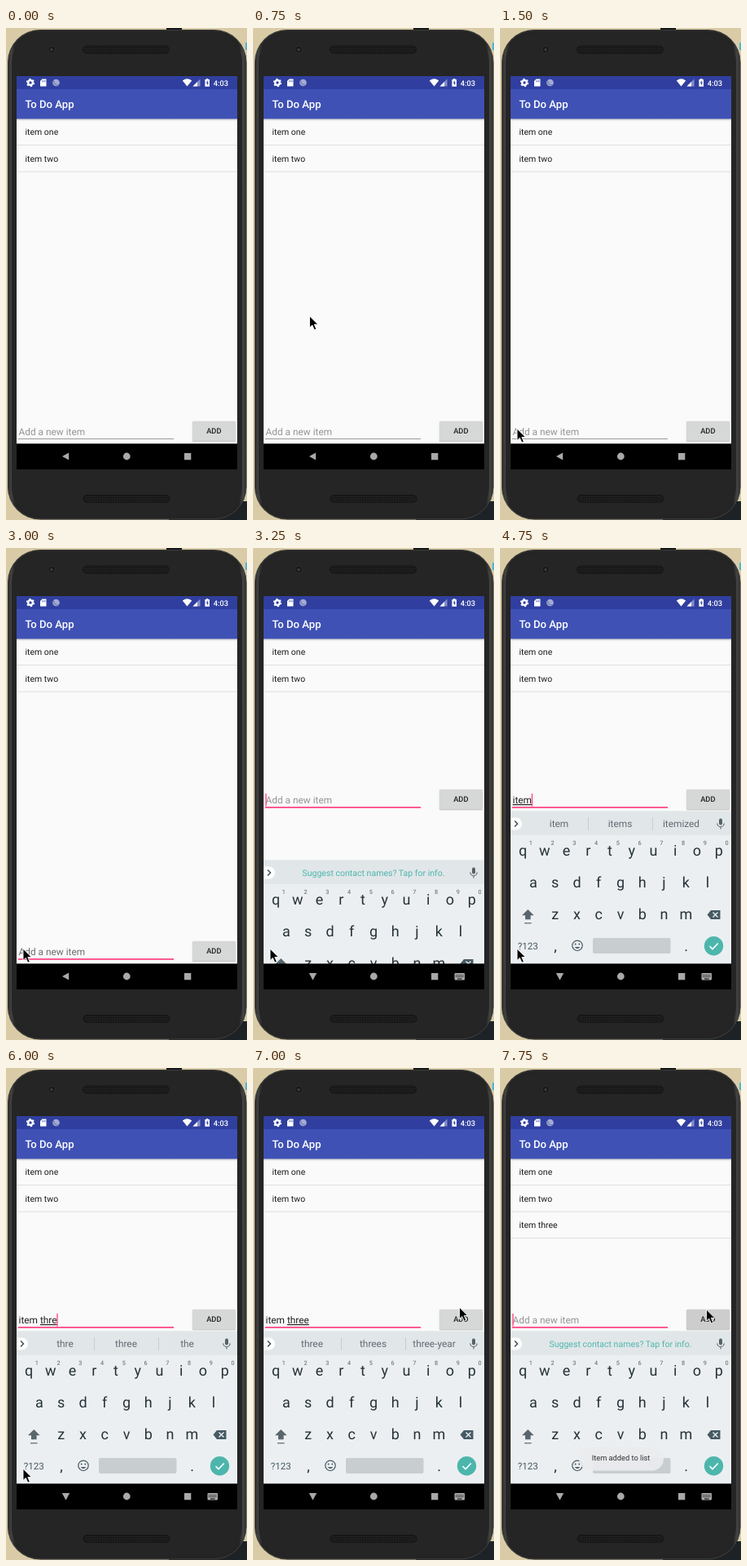
Recreate the animation shown at these times as an HTML page. Size 296x603 px, loop 8000 ms.

```html
<!DOCTYPE html>
<html lang="en">
<head>
<meta charset="utf-8">
<title>To Do App</title>
<style>
  html, body { margin: 0; width: 100%; height: 100%; overflow: hidden; background: #d8cba6; }
  svg { display: block; width: 296px; height: 603px; font-family: Roboto, sans-serif; text-rendering: geometricPrecision; }
  text { white-space: pre; }
  .mid { text-anchor: middle; }
  .med { font-weight: 500; }
  .row { font-size: 10.5px; fill: #1c1c1c; }
  .field { font-size: 11.86px; }
  .under { text-decoration: underline; text-decoration-thickness: 0.8px; }
  .key { font-size: 18px; fill: #263238; }
  .sug { font-size: 11.86px; fill: #5f6b71; }
</style>
</head>
<body>
<svg viewBox="0 0 296 603">
  <defs>
    <linearGradient id="side">
      <stop offset="0" stop-color="#2a2a2a"/>
      <stop offset=".012" stop-color="#424242"/>
      <stop offset=".03" stop-color="#242424"/>
      <stop offset=".97" stop-color="#242424"/>
      <stop offset=".988" stop-color="#454545"/>
      <stop offset="1" stop-color="#2a2a2a"/>
    </linearGradient>
    <linearGradient id="shade" x2="0" y2="1">
      <stop offset="0" stop-opacity=".22"/>
      <stop offset="1" stop-opacity="0"/>
    </linearGradient>
    <pattern id="mesh" width="3" height="3" patternUnits="userSpaceOnUse">
      <rect width="3" height="3" fill="#191919"/>
      <circle cx="1.5" cy="1.5" r=".8" fill="#262626"/>
    </pattern>
    <clipPath id="panel"><rect x="13" y="111" width="271" height="399"/></clipPath>
  </defs>

  <!-- desktop and phone body -->
  <rect width="296" height="603" fill="#d8cba6"/>
  <path d="M197 0h19v4h-19z" fill="#15171a"/>
  <path d="M294 18h2v9h-2z" fill="#4fb3d2"/>
  <path d="M200 599h96v4h-96zM264 580h32v23h-32z" fill="#1c2226"/>
  <rect x="2" y="2" width="293.500" height="600.500" rx="40" fill="#2a2a2a"/>
  <rect x="2.800" y="2.800" width="292" height="599" rx="39.500" fill="url(#side)" stroke="#474747" stroke-width=".7"/>
  <rect x="7" y="7" width="283" height="590.500" rx="35" fill="#252525"/>
  <rect x="94.500" y="22" width="106" height="9" rx="4.500" fill="url(#mesh)" stroke="#141414"/>
  <rect x="95" y="572.500" width="106" height="9" rx="4.500" fill="url(#mesh)" stroke="#141414"/>
  <circle cx="56" cy="26.500" r="4.500" fill="#1a1a1a" stroke="#353535" stroke-width=".8"/>
  <circle cx="56" cy="26.500" r="1.600" fill="#3c4144"/>

  <!-- app -->
  <rect x="13" y="59" width="271" height="482" fill="#fafafa"/>
  <rect x="13" y="59" width="271" height="16" fill="#303f9f"/>
  <rect x="13" y="75" width="271" height="36.400" fill="#3f51b5"/>
  <rect x="13" y="111.400" width="271" height="2.600" fill="url(#shade)"/>
  <text class="med" x="23.500" y="98" font-size="13.2" fill="#fff">To Do App</text>
  <g fill="#fff">
    <circle cx="30" cy="67" r="2.800" fill="none" stroke="#fff" stroke-width="2.200"/>
    <circle cx="30" cy="67" r="4.300" fill="none" stroke="#fff" stroke-width="1.700" stroke-dasharray="2.250 2.250"/>
    <path d="M44.500 62.500h5v9h-7.500v-6.500z"/>
    <path d="M44.500 64.500v1.800M46.200 64v2.300M48 64v2.300" stroke="#303f9f" stroke-width=".7"/>
    <circle cx="61.500" cy="67" r="4.300" fill="#a4abd3"/>
    <path d="M59 64.500a4 4 0 0 0 5 5" fill="none" stroke="#7681be" stroke-width="1.300"/>
    <path d="M216.800 64.500q5.700-4.500 11.400 0l-5.700 7z"/>
    <path d="M238.500 62.500v9h-9z" fill="#8790c8"/>
    <path d="M235 66v5.500h-5.500z"/>
    <path d="M246 62h2.400v1h1.600v8.700h-5.600v-8.700h1.600z"/>
    <path d="M247.700 64.300l-2 3.200h1.300v2.700l2-3.400h-1.300z" fill="#303f9f"/>
    <text class="med" x="254.800" y="70.700" font-size="9.300">4:03</text>
  </g>
  <g id="list"></g>

  <g id="entry">
    <text class="field" id="hint" x="15.500" y="499">Add a new item</text>
    <text class="field" x="15.500" y="499" fill="#212121"><tspan id="done"></tspan><tspan id="word" class="under"></tspan></text>
    <rect id="line" x="15" width="191"/>
    <rect id="caret" y="487" width="1.300" height="15.500" fill="#ff4081"/>
    <rect x="228.500" y="482" width="54" height="25.800" rx="2" fill="#000" opacity=".1"/>
    <rect x="229" y="482.500" width="53" height="24.500" rx="1.500" fill="#000" opacity=".13"/>
    <rect id="button" x="229" y="481.700" width="53" height="24.500" rx="1.500"/>
    <text class="mid med" x="255.300" y="496.800" font-size="9.300" fill="#212121">ADD</text>
  </g>

  <!-- keyboard -->
  <g clip-path="url(#panel)"><g id="board">
    <rect x="13" y="322.500" width="271" height="190" fill="#eceff1"/>
    <rect x="13" y="322.500" width="271" height="29.500" fill="#e1e6e9"/>
    <path d="M13 330.500h6.500a7.500 7.500 0 0 1 0 15h-6.500z" fill="#fff"/>
    <path d="M18 334.500l3.500 3.500l-3.500 3.500" fill="none" stroke="#37474f" stroke-width="1.400"/>
    <text id="offer" class="mid" x="148" y="341.800" font-size="10.550" fill="#4db6ac">Suggest contact names? Tap for info.</text>
    <g id="sugs"><path d="M108.500 330v16M187.500 330v16" stroke="#c6ccd0"/></g>
    <rect x="269" y="331.500" width="4" height="8" rx="2" fill="#55636a"/>
    <path d="M266.800 337.500a4.200 4.200 0 0 0 8.400 0M271 341.700v2.800" fill="none" stroke="#55636a" stroke-width="1.100"/>
    <g id="keys"></g>
    <path d="M34.300 443l7.300 7.300h-4v5h-6.600v-5h-4z" fill="#59666d"/>
    <path d="M30 459.800h8.600" stroke="#59666d" stroke-width="1.200"/>
    <path d="M259 444h11.500v11h-11.500l-4.500-5.500z" fill="#455a64"/>
    <path d="M261.500 446.500l6 6m0-6l-6 6" stroke="#eceff1" stroke-width="1.400"/>
    <text x="21.800" y="491.800" font-size="11.600" fill="#455a64">?123</text>
    <circle cx="95" cy="487.300" r="6.200" fill="none" stroke="#455a64" stroke-width="1.200"/>
    <path d="M91.600 489h6.800q-3.400 4.200-6.800 0z" fill="#455a64"/>
    <circle cx="92.700" cy="485.500" r="1" fill="#455a64"/>
    <circle cx="97.300" cy="485.500" r="1" fill="#455a64"/>
    <rect x="114" y="478" width="95.500" height="19" rx="2" fill="#c8cdd0"/>
    <circle cx="262.500" cy="487.800" r="11.700" fill="#4db6ac"/>
    <path d="M257.500 488l3.500 3.500l6.800-7" fill="none" stroke="#fff" stroke-width="1.600"/>
  </g></g>

  <g id="toast">
    <rect x="97" y="464.500" width="104" height="29" rx="14.500" fill="#eaecee" opacity=".93"/>
    <text class="mid" x="148.500" y="481.300" font-size="9.250" fill="#333">Item added to list</text>
  </g>

  <!-- navigation bar -->
  <rect x="13" y="509.400" width="271" height="31.600" fill="#000"/>
  <g fill="#a9a9a9">
    <path id="back"/>
    <circle cx="148.300" cy="525" r="4.400"/>
    <rect x="219" y="521" width="8.300" height="8.300"/>
    <g id="imeIcon">
      <rect x="247.500" y="521" width="12.500" height="8.500" rx="1"/>
      <path d="M249 523.500h9.500M249 525.500h9.500" stroke="#000" stroke-dasharray="1.200 .9"/>
      <path d="M251 528h5.500" stroke="#000"/>
    </g>
  </g>

  <path id="mouse" d="M0 0V14.200L3.300 11.200L5.800 17L8.300 15.900L5.800 10.300H10.300Z" fill="#000" stroke="#fff" stroke-width=".9" stroke-linejoin="round"/>
</svg>
<script>
const LOOP = 8000, STEP = 250;
const $ = id => document.getElementById(id);
const NS = 'http://www.w3.org/2000/svg';

function add(parent, tag, attrs, text = '') {
  const el = document.createElementNS(NS, tag);
  for (const k in attrs) el.setAttribute(k, attrs[k]);
  el.textContent = text;
  parent.append(el);
  return el;
}
const show = (el, on) => { el.style.display = on ? '' : 'none'; };
const set = (el, attrs) => { for (const k in attrs) el.setAttribute(k, attrs[k]); };

const rows = ['item one', 'item two', 'item three'].map((name, i) => {
  const g = add($('list'), 'g', {});
  add(g, 'text', { class: 'row', x: 23.5, y: 131.4 + i * 32.5 }, name);
  add(g, 'rect', { x: 13, y: 143.1 + i * 32.5, width: 271, height: 0.9, fill: '#dcdcdc' });
  return g;
});

const keyRows = [['qwertyuiop', 28, 377.3], ['asdfghjkl', 41, 416], ['zxcvbnm', 67.8, 454.8], [',     .', 68, 494]];
keyRows.forEach(([chars, x0, y], r) => [...chars].forEach((c, i) => {
  const x = x0 + i * 26.75;
  if (c !== ' ') add($('keys'), 'text', { class: 'mid key', x, y }, c);
  if (!r) add($('keys'), 'text', { class: 'mid', x: x + 9.7, y: 364, 'font-size': 7.3, fill: '#55636a' }, (i + 1) % 10);
}));
const sugs = [72.5, 147.5, 222.5].map(x => add($('sugs'), 'text', { class: 'mid sug', x, y: 342.3 }));

// [start ms, x, y]
const mousePath = [
  [250, 246.5, 152.3], [500, 118.5, 268.3], [750, 69.5, 353], [1000, 27.5, 477],
  [1250, 21, 491.2], [6500, 191, 369.5], [6750, 269, 276.5], [7000, 253.5, 293.3], [7250, 253.5, 296]
];
// [start ms, finished text, word being composed, suggestions]
const typing = [
  [0, '', '', ''],
  [4250, '', 'i', ''],
  [4500, '', 'it', ''],
  [4750, '', 'item', 'item items itemized'],
  [5000, 'item ', '', 'is and in'],
  [5500, 'item ', 'th', 'th this the'],
  [5750, 'item ', 'thr', 'thr three thru'],
  [6000, 'item ', 'thre', 'thre three the'],
  [6250, 'item ', 'three', 'three threes three-year'],
  [7500, '', '', '']
];
const buttonTones = [[0, '#d6d7d7'], [7250, '#cfcfcf'], [7500, '#c6c6c6'], [7750, '#cdcdcd']];

const at = (list, t) => list.filter(e => e[0] <= t).pop();
const within = (t, a, b) => t >= a && t < b;

function draw(now) {
  const t = Math.floor(now % LOOP / STEP) * STEP;
  const open = t >= 3250, focus = t >= 3000;

  const m = at(mousePath, t);
  show($('mouse'), m);
  if (m) set($('mouse'), { transform: `translate(${m[1]} ${m[2]})` });

  show(rows[2], t >= 7500);
  show($('toast'), t >= 7750);

  set($('entry'), { transform: `translate(0 ${open ? -186 : 0})` });
  const [, done, word, words] = at(typing, t);
  $('done').textContent = done;
  $('word').textContent = word;
  show($('hint'), !done && !word);
  set($('hint'), { fill: focus && !open ? '#6c6c6c' : '#949494' });
  set($('line'), focus
    ? { y: 503.1, height: 1.7, fill: '#ff4081' }
    : { y: 503.2, height: 0.9, fill: '#8b8b8b' });
  const blink = within(t, 3750, 4250) || within(t, 6750, 7250);
  show($('caret'), open && !blink);
  set($('caret'), { x: 15.3 + $('done').parentNode.getComputedTextLength() });
  set($('button'), { fill: at(buttonTones, t)[1] });

  show($('board'), open);
  set($('board'), { transform: `translate(0 ${t < 3500 ? 60 : 0})` });
  show($('offer'), !words);
  show($('sugs'), words);
  words.split(' ').forEach((w, i) => { sugs[i].textContent = w; });

  set($('back'), { d: open ? 'M68.800 521h9.400l-4.700 8.800z' : 'M77.200 520.600v8.800l-8.200-4.400z' });
  show($('imeIcon'), open);
}

const start = performance.now();
function tick() {
  draw(performance.now() - start);
  requestAnimationFrame(tick);
}
tick();
</script>
</body>
</html>
```
